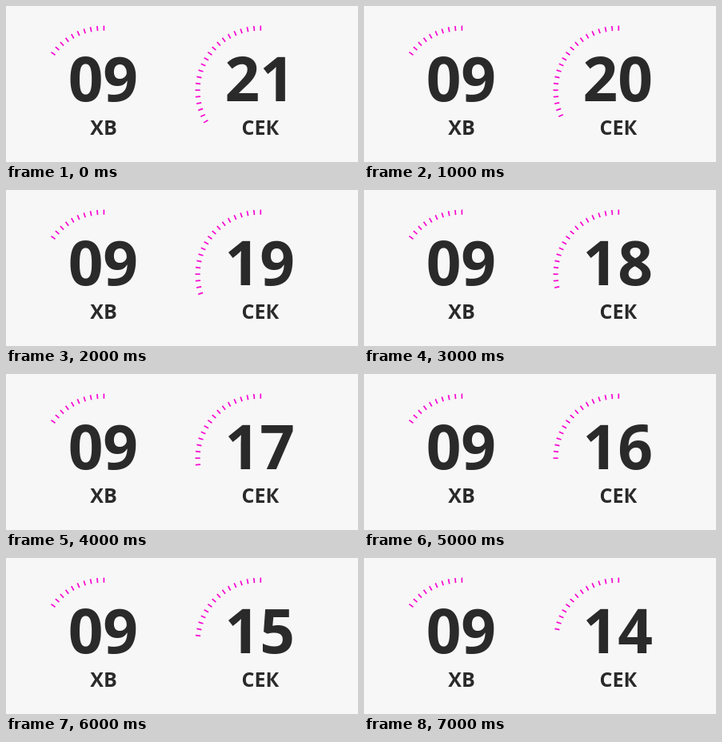
Animation of 440 by 195 pixels, one loop 8 s. Source, as an HTML page:

```html
<!DOCTYPE html>
<html lang="uk">
<head>
<meta charset="utf-8">
<title>Countdown</title>
<style>
  html, body { margin: 0; width: 100%; height: 100%; overflow: hidden; background: #f7f7f7; }
  svg { display: block; width: 440px; height: 195px; }
  text { font-family: "Open Sans", "Noto Sans", sans-serif; font-weight: 700; fill: #2a2a2a; text-anchor: middle; }
  .num { font-size: 76.5px; }
  .unit { font-size: 25px; }
  line { stroke: #f808d2; stroke-width: 1.7; }
</style>
</head>
<body>
<svg id="stage" viewBox="0 0 440 195"></svg>
<script>
const LOOP = 8000, START = 21, MINUTES = 9;
const OUTER = 81.2, INNER = 75, CY = 105.8, SHIFT = 0.6;
const stage = document.getElementById('stage');

function add(tag, attrs, text = '') {
  const el = document.createElementNS('http://www.w3.org/2000/svg', tag);
  for (const key in attrs) el.setAttribute(key, attrs[key]);
  el.textContent = text;
  stage.appendChild(el);
  return el;
}

// A dial has one tick per unit, six degrees apart, counterclockwise from the top.
function makeDial(cx, unit, maxTicks) {
  const ticks = Array.from({ length: maxTicks }, (_, i) => add('line', {
    x1: cx + SHIFT, x2: cx + SHIFT, y1: CY - OUTER, y2: CY - INNER,
    transform: `rotate(${-6 * i} ${cx} ${CY})`
  }));
  const num = add('text', { class: 'num', x: cx - 0.5, y: 119 });
  add('text', { class: 'unit', x: cx + 0.2, y: 161 }, unit);
  return (value, count) => {
    num.textContent = String(value).padStart(2, '0');
    ticks.forEach((tick, i) => tick.setAttribute('visibility', i < count ? 'visible' : 'hidden'));
  };
}

const setMinutes = makeDial(121.8, 'ХВ', MINUTES + 1);
const setSeconds = makeDial(317.7, 'СЕК', START);

function draw(ms) {
  const sec = START - Math.floor((ms % LOOP) / 1000);
  setMinutes(MINUTES, MINUTES + 1);
  setSeconds(sec, sec);
}

const begin = performance.now();
function frame() {
  draw(performance.now() - begin);
  requestAnimationFrame(frame);
}
frame();
</script>
</body>
</html>
```
